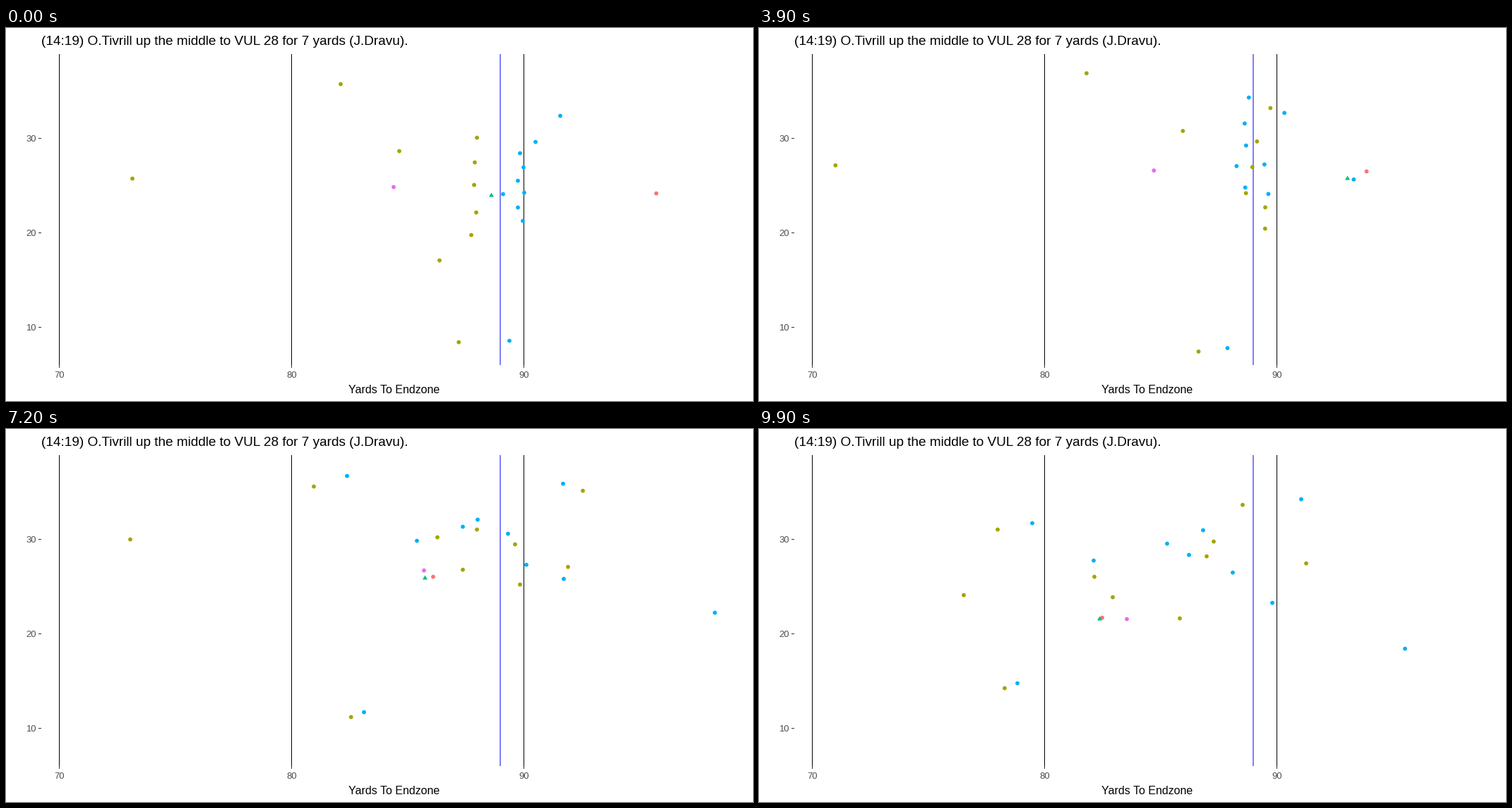
These frames come from a looping animation (1058x529 px, 10 s). A matplotlib script:

```python
import numpy as np
import matplotlib.pyplot as plt
from matplotlib.animation import FuncAnimation

W, H, DPI = 1058, 529, 100
FRAMES, STEP = 100, 100
PX = 72 / DPI  # one pixel in points

OLIVE, BLUE = "#A3A500", "#00B0F6"
RED, GREEN, PINK = "#F8766D", "#00BF7D", "#E76BF3"
GREY20, GREY30 = "#333333", "#4D4D4D"

SNAP, HANDOFF = 2.0, 4.0
KEYS = np.array([0, SNAP, 3.1, 4.7, 7.2, 9.9])
DRIFT = {OLIVE: 0.3, PINK: 0.1, BLUE: 0.05, RED: 0.1}  # share of first leg before the snap

plt.rcParams["font.family"] = "Liberation Sans"
now = np.arange(FRAMES)[:, None] * STEP / 1000


def ease(start, end):
    s = np.clip((now - start) / (end - start), 0, 1)
    return s * s * (3 - 2 * s)


def hermite(p):
    """Smooth path through p at KEYS, starting from a near standstill."""
    m = np.gradient(p, KEYS, axis=0)
    m[:2] = (p[1] - p[0]) / SNAP
    i = np.clip(np.searchsorted(KEYS, now[:, 0], side="right") - 1, 0, len(KEYS) - 2)
    h = (KEYS[i + 1] - KEYS[i])[:, None]
    s = (now - KEYS[i][:, None]) / h
    return ((1 + 2 * s) * (1 - s) ** 2 * p[i] + s * (1 - s) ** 2 * h * m[i]
            + s ** 2 * (3 - 2 * s) * p[i + 1] - s ** 2 * (1 - s) * h * m[i + 1])


players = []


def run(color, start, *spots):
    """Add a player who lines up at start and runs through four spots."""
    p = np.array([start, start, *spots], float)
    p[1] += DRIFT[color] * (p[2] - p[0])
    path = hermite(p)
    players.append((color, path))
    return path


# front and secondary
run(OLIVE, (474, 80), (467, 73), (460, 58), (436, 82), (338, 143))
run(OLIVE, (557, 175), (573, 160), (627, 135), (611, 154), (475, 210))
run(OLIVE, (667, 156), (697, 133), (754, 96), (817, 88), (685, 108))
run(OLIVE, (664, 191), (692, 173), (716, 152), (721, 164), (634, 181))
run(OLIVE, (663, 223), (694, 212), (697, 181), (667, 143), (644, 160))
run(OLIVE, (666, 262), (675, 247), (701, 222), (647, 200), (501, 239))
run(OLIVE, (659, 294), (692, 275), (743, 233), (796, 196), (775, 191))
run(OLIVE, (614, 330), (690, 310), (734, 258), (728, 221), (596, 269))
run(OLIVE, (179, 214), (131, 205), (96, 184), (176, 157), (290, 236))
run(PINK, (549, 226), (553, 217), (567, 189), (592, 201), (521, 270))

# blockers
run(BLUE, (785, 125), (748, 117), (632, 80), (483, 67), (387, 134))
run(BLUE, (750, 162), (737, 139), (757, 104), (789, 78), (768, 100))
run(BLUE, (728, 178), (710, 154), (666, 122), (647, 139), (578, 163))
run(BLUE, (733, 198), (699, 180), (686, 155), (668, 129), (629, 144))
run(BLUE, (725, 217), (692, 206), (661, 186), (582, 159), (474, 187))
run(BLUE, (704, 236), (716, 213), (713, 176), (711, 149), (609, 179))
run(BLUE, (725, 255), (696, 239), (690, 215), (737, 193), (671, 204))
run(BLUE, (732, 274), (718, 252), (732, 222), (790, 213), (727, 247))

# wide receiver, with the cornerback closing in on him
wide = run(BLUE, (713, 444), (690, 452), (631, 452), (507, 402), (366, 361))
gap = 1 / (1 + np.exp(1.5 * (now - 3.7)))
players.append((OLIVE, wide + np.hstack([-18 - 54 * gap, 7 - 5 * gap])))

# passer, runner, and the ball that goes from one to the other
passer = run(BLUE, (734, 234), (783, 224), (904, 211), (1004, 261), (915, 312))
runner = run(RED, (921, 235), (899, 221), (809, 189), (605, 210), (486, 268))

carry = np.interp(now, [4.7, 7.2, 9.9], [11, -12, -4])
held = passer + [-16, -2]
carried = runner + np.hstack([carry, np.full_like(carry, -0.5)])
spot = np.array([686.5, 235.5])
ball = spot + ease(SNAP, SNAP + 0.3) * (held - spot)
ball += ease(HANDOFF - 0.2, HANDOFF + 0.2) * (carried - ball)

colors = [c for c, _ in players]
paths = np.array([p for _, p in players]) - [0, 0.4]

fig = plt.figure(figsize=(W / DPI, H / DPI), dpi=DPI, facecolor="white")
ax = fig.add_axes([0, 0, 1, 1])
ax.set_xlim(0, W)
ax.set_ylim(H, 0)
ax.axis("off")


def line(xs, ys, color):
    ax.plot(xs, ys, color=color, lw=PX, solid_capstyle="butt", snap=False, zorder=1)


def text(x, y, s, size, color="black", ha="center"):
    ax.text(x, y, s, fontsize=size * PX, color=color, ha=ha, va="baseline")


def field_x(yards):
    return 75.5 + 32.9 * (yards - 70)


for yards in (70, 80, 90):
    x = field_x(yards)
    line([x, x], [478, 482], GREY20)
    line([x, x], [37, 478], "black")
    text(x, 496.5, yards, 13, GREY30)
line([field_x(89) - 0.6] * 2, [37, 478], "blue")

for width in (10, 20, 30):
    y = 558.5 - 13.4 * width
    line([46, 50], [y, y], GREY20)
    text(42.5, y + 4.5, width, 13, GREY30, ha="right")

text(50, 23.5, "(14:19) O.Tivrill up the middle to VUL 28 for 7 yards (J.Dravu).",
     19, ha="left")
text(549.5, 518, "Yards To Endzone", 16)

dots = ax.scatter(*paths[:, 0].T, s=(5.8 * PX) ** 2, c=colors, linewidths=0, zorder=2)
wedge = [(0, 1), (-1.16, -1), (1.16, -1), (0, 1)]
mark = ax.scatter(*ball[:1].T, s=(7 * PX) ** 2, c=GREEN, marker=wedge, linewidths=0, zorder=3)


def draw(k):
    dots.set_offsets(paths[:, k])
    mark.set_offsets(ball[k:k + 1])
    return dots, mark


anim = FuncAnimation(fig, draw, frames=FRAMES, interval=STEP, repeat=True, repeat_delay=0)
plt.show()
```
